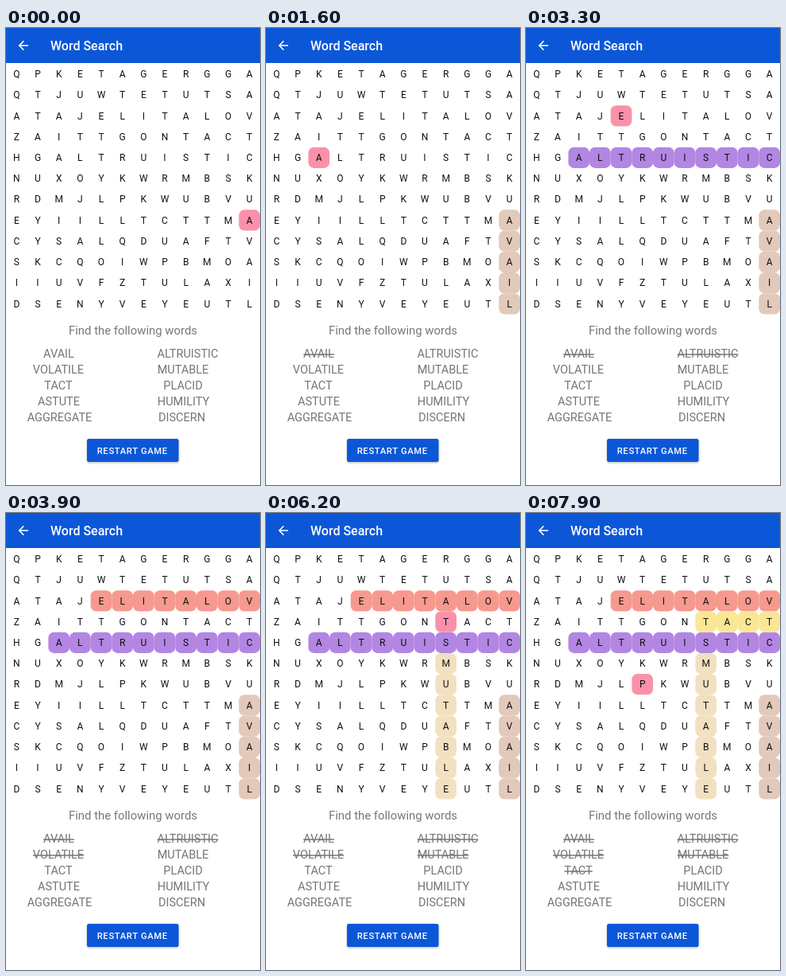
Recreate the animation shown at these times as an HTML page. Size 320 by 574 pixels, loop 8 s.

```html
<!DOCTYPE html>
<html lang="en">
<head>
<meta charset="utf-8">
<title>Word Search</title>
<style>
  html, body { margin: 0; width: 100%; height: 100%; overflow: hidden; background: #fff; }
  svg { display: block; width: 100%; height: 100%; font-family: Roboto, "Liberation Sans", sans-serif; }
  .title { font-size: 16px; font-weight: 500; fill: #fff; }
  .letter { font-size: 12px; fill: #111; text-anchor: middle; }
  .hint { font-size: 14.9px; fill: #777; text-anchor: middle; }
  .word { font-size: 14.5px; fill: #757575; text-anchor: middle; }
  .struck { text-decoration: line-through; }
  .label { font-size: 11.2px; font-weight: 500; letter-spacing: .7px; fill: #fff; }
  .button { filter: drop-shadow(0 1px 1.5px rgba(0, 0, 0, .3)); }
</style>
</head>
<body>
<svg id="stage" viewBox="0 0 320 574">
  <rect width="320" height="44" fill="#0b57d8"/>
  <path d="M28 22H16.8M22.3 16.4L16.7 22L22.3 27.6" fill="none" stroke="#fff" stroke-width="1.5"/>
  <text class="title" x="56" y="28.2">Word Search</text>
  <g id="marks"></g>
  <g id="letters"></g>
  <text class="hint" x="160" y="384.7">Find the following words</text>
  <g id="words"></g>
  <rect class="button" x="102" y="516" width="115.5" height="29" rx="2.5" fill="#0b57d8"/>
  <text class="label" x="114.7" y="534.7">RESTART GAME</text>
</svg>
<script>
const LOOP = 8000;
const CELL = 320 / 12, ROW = 26.22, TOP = 44.8;
const PINK = '#fb91a9';
const grid = `QPKETAGERGGA QTJUWTETUTSA ATAJELITALOV ZAITTGONTACT
  HGALTRUISTIC NUXOYKWRMBSK RDMJLPKWUBVU EYIILLTCTTMA
  CYSALQDUAFTV SKCQOIWPBMOA IIUVFZTULAXI DSENYVEYEUTL`.split(/\s+/);

// Each turn: first cell tapped at "tap", word completed at "found".
const turns = [
  { word: 'AVAIL', col: 11, row: 7, dx: 0, dy: 1, tap: 0, found: 500, color: '#e2c9ba' },
  { word: 'ALTRUISTIC', col: 2, row: 4, dx: 1, dy: 0, tap: 1400, found: 2000, color: '#b286e2' },
  { word: 'VOLATILE', col: 4, row: 2, dx: 1, dy: 0, tap: 3000, found: 3900, color: '#f6998f' },
  { word: 'MUTABLE', col: 8, row: 5, dx: 0, dy: 1, tap: 4600, found: 5400, color: '#f2e0c1' },
  { word: 'TACT', col: 8, row: 3, dx: 1, dy: 0, tap: 6000, found: 6900, color: '#fae796' },
  { word: 'PLACID', col: 5, row: 6, dx: 0, dy: 0, tap: 7700, found: LOOP, color: PINK }
];

// Words with the centre of each line.
const columns = [
  [['AVAIL', 66.5], ['VOLATILE', 66], ['TACT', 66], ['ASTUTE', 66.5], ['AGGREGATE', 67.5]],
  [['ALTRUISTIC', 229], ['MUTABLE', 223], ['PLACID', 223], ['HUMILITY', 223.5], ['DISCERN', 221.5]]
];

function add(parent, tag, attrs, text = '') {
  const el = document.createElementNS('http://www.w3.org/2000/svg', tag);
  for (const key in attrs) el.setAttribute(key, attrs[key]);
  el.textContent = text;
  return parent.appendChild(el);
}

function addCell(parent, col, row, fill) {
  add(parent, 'rect', {
    x: col * CELL, y: TOP + row * ROW, width: CELL, height: ROW, rx: 7, fill
  });
}

const byId = id => document.getElementById(id);

grid.forEach((line, row) => [...line].forEach((char, col) =>
  add(byId('letters'), 'text', {
    class: 'letter', x: (col + .5) * CELL, y: TOP + (row + .5) * ROW + 4.2
  }, char)));

const labels = {};
columns.forEach(list => list.forEach(([word, x], i) => {
  labels[word] = add(byId('words'), 'text', { class: 'word', x, y: 414.4 + i * 20 }, word);
}));

for (const turn of turns) {
  turn.start = add(byId('marks'), 'g', {});
  addCell(turn.start, turn.col, turn.row, PINK);
  turn.trail = add(byId('marks'), 'g', {});
  for (let i = 0; i < turn.word.length; i++) {
    addCell(turn.trail, turn.col + i * turn.dx, turn.row + i * turn.dy, turn.color);
  }
}

const show = (el, on) => el.setAttribute('visibility', on ? 'visible' : 'hidden');

function draw(time) {
  const t = time % LOOP;
  for (const turn of turns) {
    const done = t >= turn.found;
    show(turn.start, t >= turn.tap && !done);
    show(turn.trail, done);
    labels[turn.word].classList.toggle('struck', done);
  }
}

const begin = performance.now();
function tick() {
  draw(performance.now() - begin);
  requestAnimationFrame(tick);
}
tick();
</script>
</body>
</html>
```
